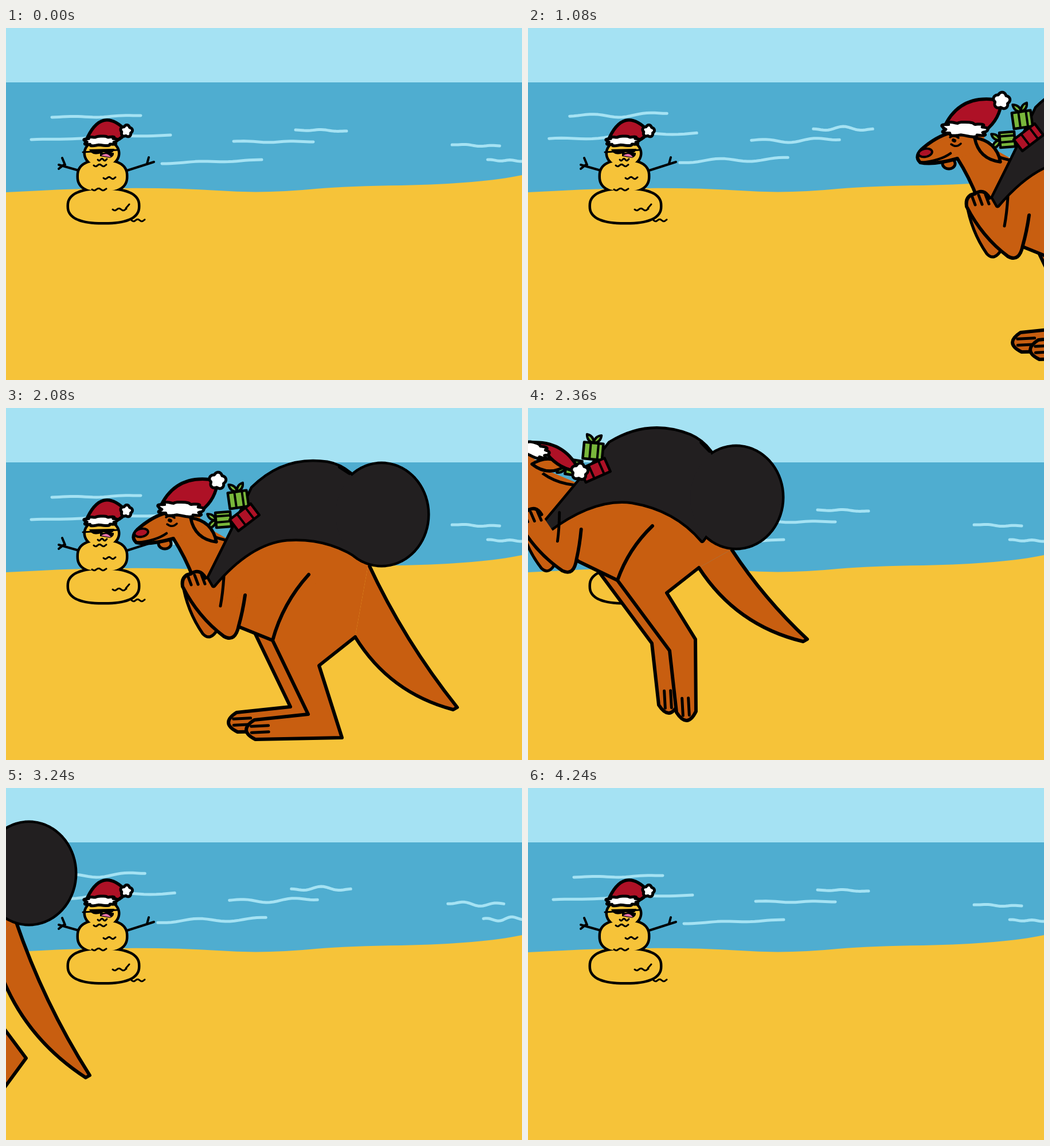
An HTML page with a canvas for the animation above (4320 ms loop, 900x615 px).

```html
<!DOCTYPE html>
<html lang="en">
<head>
<meta charset="utf-8">
<title>Beach Christmas</title>
<style>
html, body { margin: 0; width: 100%; height: 100%; overflow: hidden; background: #f6c339; }
canvas { display: block; width: 100vw; height: 100vh; }
</style>
</head>
<body>
<canvas id="stage" width="900" height="615"></canvas>
<script>
const ctx = document.getElementById('stage').getContext('2d');
const LOOP = 4320, HOP = 960, STRIDE = 457, FIRST = 1400, SWELL = 720;
const SKY = '#a5e2f3', SEA = '#4fadd0', SAND = '#f6c339', FUR = '#c85e10',
      BAG = '#221f20', RED = '#ae1126', GREEN = '#79b73b', PINK = '#e873ab';

// ---------- points ----------
const lerp = (a, b, k) => a + (b - a) * k;
const ease = k => k * k * (3 - 2 * k);
const add = ([x, y], dx, dy) => [x + dx, y + dy];
const mid = (a, b, k = 0.5) => [lerp(a[0], b[0], k), lerp(a[1], b[1], k)];
const sub = (a, b) => [a[0] - b[0], a[1] - b[1]];
// control point that bends the line a-b sideways by a share of its length
const bow = (a, b, k) => add(mid(a, b), (a[1] - b[1]) * k, (b[0] - a[0]) * k);
const spin = ([x, y], [cx, cy], angle) => {
  const c = Math.cos(angle), s = Math.sin(angle);
  return [cx + (x - cx) * c - (y - cy) * s, cy + (x - cx) * s + (y - cy) * c];
};
const mapPose = (pose, fn) =>
  Object.fromEntries(Object.entries(pose).map(([name, p]) => [name, fn(p, name)]));

// ---------- drawing ----------
// each step is a point, or a [control, point] pair for a curve
function trace([first, ...steps]) {
  ctx.beginPath();
  ctx.moveTo(...first);
  for (const s of steps) {
    if (Array.isArray(s[0])) ctx.quadraticCurveTo(...s[0], ...s[1]);
    else ctx.lineTo(...s);
  }
}
function ink(steps, width = 5, color = '#000') {
  trace(steps);
  ctx.lineWidth = width;
  ctx.strokeStyle = color;
  ctx.stroke();
}
function paint(steps, fill) {
  trace(steps);
  ctx.fillStyle = fill;
  ctx.fill();
}
function shape(steps, fill, width = 6) {
  paint(steps, fill);
  ink(steps, width);
}
// merges overlapping outlines into one silhouette
function union(outlines, fill, width) {
  outlines.forEach(o => ink(o, width));
  outlines.forEach(o => paint(o, fill));
}
// rounded blob, optionally with puffy lobes
function blob([x, y], rx, ry, { lobes = 0, square = 1, angle = 0 } = {}) {
  const pts = [], soft = v => Math.sign(v) * Math.abs(v) ** square;
  for (let i = 0; i <= 72; i++) {
    const a = i * Math.PI / 36;
    const r = lobes ? 0.82 + 0.24 * Math.abs(Math.cos(lobes * a / 2 + 0.5)) : 1;
    pts.push(spin([x + rx * r * soft(Math.cos(a)), y + ry * r * soft(Math.sin(a))], [x, y], angle));
  }
  return pts;
}
const leaf = (a, b, fat, width) =>
  shape([a, [bow(a, b, fat), b], [bow(a, b, -fat), a]], GREEN === leaf.fill ? GREEN : leaf.fill, width);

function hat({ brimL, brimR, bend, bob }, thick, fluff) {
  const [dx, dy] = sub(brimR, brimL);
  shape([brimL, [bend, bob], [bow(brimR, bob, 0.22), brimR]], RED, 5.5);
  shape(blob(mid(brimL, brimR), Math.hypot(dx, dy) / 2 + 2, thick,
    { lobes: 9, square: 0.7, angle: Math.atan2(dy, dx) }), '#fff', 5);
  shape(blob(bob, fluff, fluff, { lobes: 5 }), '#fff', 5);
}

// ---------- scenery ----------
// left end, right end
const waves = [
  [[80, 156], [235, 153]], [[44, 195], [287, 187]], [[272, 237], [446, 230]], [[397, 198], [536, 199]],
  [[505, 178], [594, 180]], [[778, 204], [861, 206]], [[840, 230], [902, 233]]
];

function drawWaves(t) {
  const phase = t % SWELL;
  const swell = phase < 200 || phase > 640 ? 0 : Math.sin((phase - 200) / 440 * Math.PI);
  waves.forEach(([a, b], n) => {
    const from = add(a, -8 * swell, -2 * swell), to = add(b, 8 * swell, -4 * swell), pts = [];
    for (let i = 0; i <= 24; i++) {
      const u = i / 24;
      const rise = Math.sin(u * 9 + n * 2.4) * (1.5 + 3 * swell) * Math.sin(u * Math.PI);
      pts.push(add(mid(from, to, u), 0, -rise));
    }
    ink(pts, 5, SKY);
  });
}

function drawScene(t) {
  ctx.fillStyle = SKY;
  ctx.fillRect(0, 0, 900, 96);
  ctx.fillStyle = SEA;
  ctx.fillRect(0, 95, 900, 200);
  drawWaves(t);
  paint([[0, 287], [[220, 274], [370, 284]], [[450, 290], [540, 281]], [[600, 276], [690, 275]],
    [[830, 272], [900, 257]], [900, 615], [0, 615]], SAND);
}

function fold(x, y, length) {
  const pts = [];
  for (let i = 0; i <= 12; i++) pts.push([x + length * i / 12, y + 1.8 * Math.sin(i * 0.85)]);
  ink(pts, 3);
}

function twig(from, to, fork, finger) {
  ink([from, to], 4);
  ink([fork, finger], 4);
}

const snowHat = { brimL: [139, 198], brimR: [191, 197], bend: [166, 134], bob: [210, 180] };

function drawSnowman() {
  twig([127, 249], [92, 239], [103, 239], [98, 227]);
  ink([[92, 246], [102, 238]], 4);
  twig([208, 250], [258, 234], [246, 237], [249, 226]);
  union([
    blob([170, 311], 60, 28, { square: 0.8 }),
    blob([168, 259], 41, 26, { square: 0.8 }),
    blob([167, 219], 28, 22)
  ], SAND, 9);
  [[153, 240, 22], [170, 262, 21], [150, 282, 25], [186, 317, 24], [219, 336, 23], [160, 230, 16]]
    .forEach(f => fold(...f));
  ink([[209, 315], [215, 308]], 3);
  ink([[134, 217], [195, 213]], 3);
  paint([[145, 212], [189, 211], [[188, 222], [170, 217]], [[150, 226], [145, 212]]], '#000');
  paint([[164, 218], [188, 218], [[189, 224], [182, 227]], [164, 224]], '#000');
  paint([[166, 223], [[176, 216], [183, 226]], [166, 223]], PINK);
  hat(snowHat, 8, 10);
}

// ---------- kangaroo poses, as joints ----------
const stand = {
  nose: [225, 225], eye: [287, 197], jaw: [292, 228], lip: [277, 237], nape: [392, 232],
  brimL: [268, 175], brimR: [341, 179], bend: [296, 112], bob: [369, 127],
  ear: [322, 192], earTip: [367, 234], farEar: [284, 182], farTip: [288, 174],
  hand: [327, 298], elbow: [388, 402], tip: [357, 300], notch: [598, 113], lobe: [655, 186],
  back: [632, 272], rump: [609, 400], tailTip: [787, 523],
  hip: [528, 291], groin: [465, 406], knee: [546, 450], ankle: [527, 535], heel: [586, 576], toe: [434, 562]
};
const air = {
  nose: [358, 70], eye: [433, 84], jaw: [420, 117], lip: [412, 98], nape: [552, 135],
  brimL: [436, 64], brimR: [490, 80], bend: [517, 46], bob: [547, 111],
  ear: [464, 98], earTip: [523, 101], farEar: [434, 68], farTip: [416, 54],
  hand: [460, 188], elbow: [525, 287], tip: [490, 203], notch: [773, 74], lobe: [820, 156],
  back: [812, 247], rump: [755, 279], tailTip: [944, 404],
  hip: [674, 206], groin: [613, 301], knee: [699, 323], ankle: [704, 424], heel: [749, 404], toe: [733, 531]
};
const planted = ['ankle', 'heel', 'toe'], face = ['nose', 'eye'];
const crouch = {
  ...mapPose(stand, (p, name) => planted.includes(name) ? p
    : face.includes(name) ? add(spin(p, stand.nose, 0.07), 10, 67)
    : add(spin(p, [600, 400], -0.187), 45, 6)),
  brimL: [282, 244], brimR: [350, 257], bend: [318, 200], bob: [368, 179], lip: [285, 285],
  ear: [340, 270], earTip: [386, 247], farEar: [280, 261], farTip: [244, 237]
};
const push = {
  ...mapPose(air, p => add(p, -323, -7)),
  back: [474, 232], tailTip: [603, 502], ankle: [432, 482], heel: [492, 472], toe: [402, 566]
};
const keys = [[0, air], [160, crouch], [640, stand], [880, push],
  [HOP, mapPose(air, p => add(p, -STRIDE, 0))]];

function poseAt(time) {
  const i = keys.findIndex(k => k[0] > time);
  const [t0, from] = keys[i - 1], [t1, to] = keys[i];
  const k = ease((time - t0) / (t1 - t0));
  return mapPose(from, (p, name) => mid(p, to[name], k));
}

// ---------- kangaroo parts ----------
// runs draw in standing coordinates, carried along by the bone a-b
function onBone([a0, b0], [a, b], draw) {
  const [x0, y0] = sub(b0, a0), [x, y] = sub(b, a), d = x0 * x0 + y0 * y0;
  const c = (x * x0 + y * y0) / d, s = (y * x0 - x * y0) / d;
  ctx.save();
  ctx.transform(c, s, -s, c, a[0], a[1]);
  ctx.translate(-a0[0], -a0[1]);
  draw();
  ctx.restore();
}

function drawLeg({ hip, groin, ankle, toe, heel, knee, rump }) {
  const [dx, dy] = sub(toe, mid(ankle, heel)), len = Math.hypot(dx, dy);
  const along = [dx / len, dy / len];
  // point on the foot: forward from the toe, and across it
  const foot = (f, n) => add(toe, along[0] * f - along[1] * n, along[1] * f + along[0] * n);
  const side = Math.sign(along[0] * (ankle[1] - toe[1]) - along[1] * (ankle[0] - toe[0]));
  shape([hip, [bow(hip, groin, 0.12), groin], ankle, foot(0, 17 * side),
    [foot(30, 0), foot(0, -17 * side)], heel, knee, rump], FUR);
  for (const n of [-5, 6]) ink([foot(6, n), foot(-24, n)]);
}

function drawArm(hand, elbow) {
  onBone([stand.hand, stand.elbow], [hand, elbow], () => {
    const outline = [[348, 297], [[338, 279], [322, 290]], [[305, 293], [308, 312]],
      [[335, 365], [380, 399]], [[400, 410], [406, 380]], [[413, 355], [417, 327]]];
    paint([...outline, [374, 340]], FUR);
    ink(outline, 6);
    for (const x of [317, 329, 341]) ink([[x, 314 - x / 15], [x + 6, 330 - x / 15]]);
  });
}

function drawBody(p) {
  const belly = add(p.elbow, 20, -19);
  const front = [p.jaw, [bow(p.jaw, p.hand, -0.05), p.hand], belly, p.groin];
  const neck = [p.ear, [bow(p.ear, p.nape, 0.22), p.nape]];
  paint([...front, p.knee, p.rump, p.back, p.lobe, mid(p.notch, p.nape), p.nape, p.ear], FUR);
  ink(front, 6);
  ink(neck);
}

function drawTail({ back, tailTip, rump }) {
  const end = add(tailTip, -7, 4);
  shape([back, [bow(back, tailTip, 0.06), tailTip], end, [bow(end, rump, -0.2), rump]], FUR);
}

function gift(x, y, w, h, angle, color, bowed) {
  ctx.save();
  ctx.translate(x, y);
  ctx.rotate(angle);
  const l = -w / 2, t = -h / 2;
  shape([[l, t], [-l, t], [-l, -t], [l, -t], [l, t]], color, 4.5);
  ink([[w * 0.25, t], [w * 0.25, -t]], 4);
  ink([[-w * 0.15, t], [-w * 0.15, -t]], 4);
  leaf.fill = color;
  if (bowed) for (const dx of [-13, 12]) leaf([0, t], [dx, t - 14], 0.4, 4);
  ctx.restore();
}

function drawSack(p) {
  const bone = [stand.tip, stand.notch];
  const sack = [[354, 296], [[400, 205], [430, 140]], [[485, 85], [560, 96]], [[582, 100], [600, 115]],
    [655, 186], [622, 266], [[565, 224], [490, 229]], [[425, 235], [362, 310]], [354, 296]];
  const lobe = blob(p.lobe, 80, 88);
  const carried = draw => onBone(bone, [p.tip, p.notch], draw);
  carried(() => ink(sack, 9));
  ink(lobe, 9);
  carried(() => paint(sack, BAG));
  paint(lobe, BAG);
  carried(() => {
    ink([[582, 103], [599, 114]], 6);
    gift(379, 195, 26, 26, -1.65, GREEN, true);
    gift(405, 160, 33, 28, -0.14, GREEN, true);
    gift(416, 191, 46, 25, -0.65, RED, false);
  });
}

function drawHead(p) {
  leaf.fill = FUR;
  leaf(p.farEar, p.farTip, 0.35, 5);
  shape(blob(p.lip, 11, 9), FUR, 5);
  onBone([stand.nose, stand.eye], [p.nose, p.eye], () => {
    const snout = [[290, 181], [[262, 185], [234, 208]], [[215, 223], [227, 235]], [[250, 240], [292, 228]]];
    paint([...snout, [335, 212], [340, 185]], FUR);
    ink(snout, 6);
    shape(blob([236, 218], 12, 7, { angle: -0.2 }), RED, 4);
    ink([[229, 235], [[262, 232], [280, 219]]], 4.5);
    ink([[279, 191], [[286, 186], [294, 192]]], 3.5);
    ink([[285, 196], [287, 197]], 6);
    ink([[281, 203], [[290, 210], [298, 202]]], 3.5);
  });
  leaf(p.ear, p.earTip, 0.36, 5.5);
  hat(p, 12, 14);
}

function drawKangaroo(t) {
  const drawn = Math.floor((t - FIRST) / 80) * 80;   // posed on twos
  const hop = Math.floor(drawn / HOP);
  const p = poseAt(drawn - hop * HOP);
  ctx.save();
  ctx.translate(-STRIDE * hop, 0);
  drawLeg(mapPose(p, q => add(q, -31, -13)));
  drawArm(p.hand, add(p.elbow, -39, -3));
  drawTail(p);
  drawBody(p);
  drawLeg(p);
  drawSack(p);
  drawArm(p.hand, p.elbow);
  onBone([stand.hand, stand.elbow], [p.hand, p.elbow], () => ink([[380, 295], [[378, 325], [374, 346]]]));
  drawHead(p);
  ctx.restore();
}

ctx.lineCap = ctx.lineJoin = 'round';
const start = performance.now();
function frame() {
  const t = Math.floor((performance.now() - start) % LOOP / 40) * 40;
  drawScene(t);
  drawSnowman();
  drawKangaroo(t);
  requestAnimationFrame(frame);
}
frame();
</script>
</body>
</html>
```
